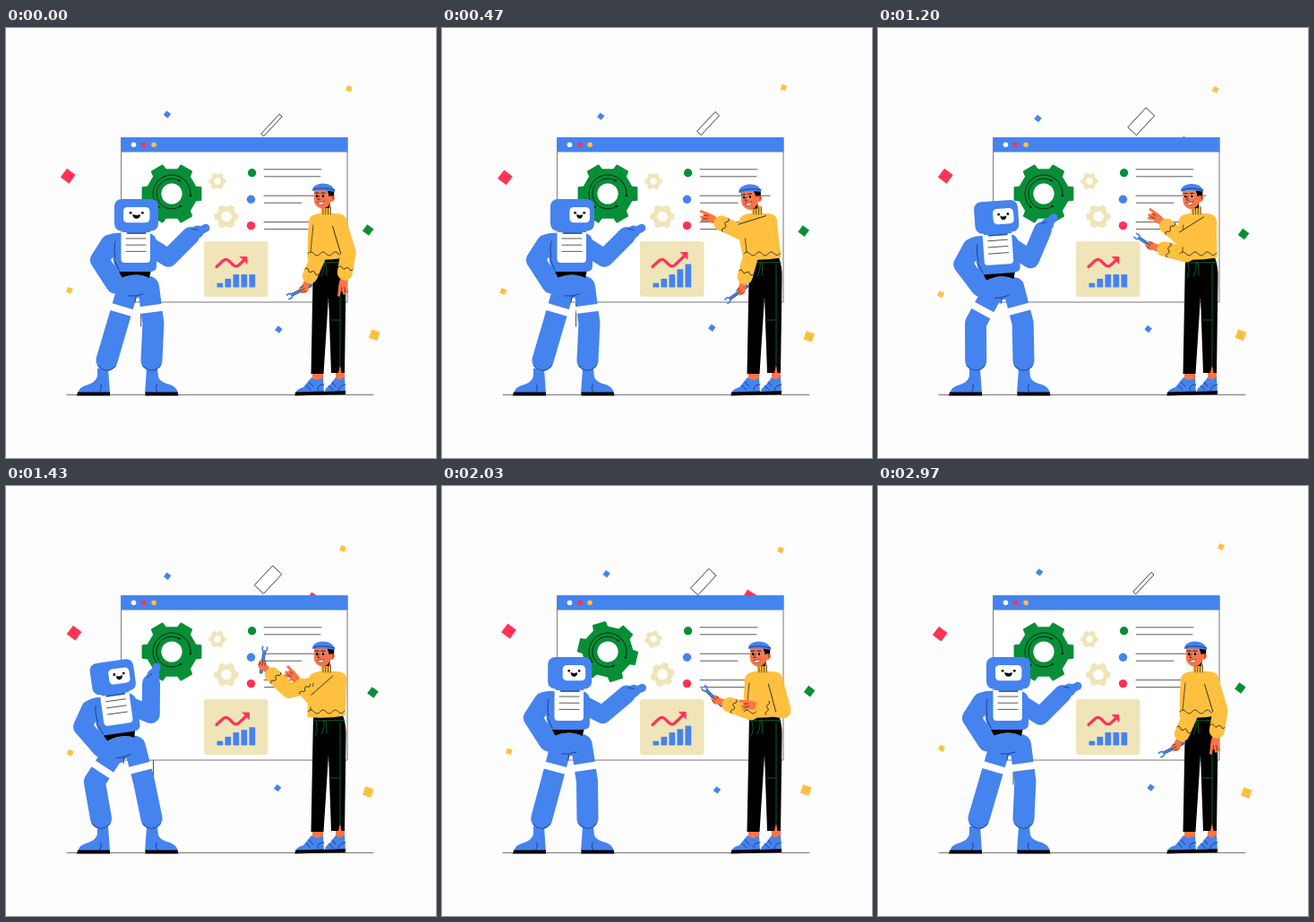
Recreate the animation shown at these times as an HTML page with a canvas. Size 480 by 480 pixels, loop 3 s.

```html
<!DOCTYPE html>
<html lang="en">
<head>
<meta charset="utf-8">
<title>Robot and mechanic</title>
<style>
html, body { margin: 0; width: 100%; height: 100%; overflow: hidden; background: #fdfdfd; }
canvas { display: block; width: 480px; height: 480px; }
</style>
</head>
<body>
<canvas width="480" height="480"></canvas>
<script>
const g = document.querySelector('canvas').getContext('2d');
const LOOP = 3000, RAD = Math.PI / 180;
const BLUE = '#4583ee', GREEN = '#088e37', RED = '#ff3355', YELLOW = '#ffc03f';
const CREAM = '#f0e5b8', SKIN = '#ff7347', INK = '#1c1c1c', NAVY = '#16336b';

// ---------- drawing helpers ----------
function shape(d, fill, stroke, width = 0.8) {
  const p = new Path2D(d);
  if (fill) { g.fillStyle = fill; g.fill(p); }
  if (stroke) { g.strokeStyle = stroke; g.lineWidth = width; g.stroke(p); }
}
const line = (d, color = INK, width = 0.8) => shape(d, null, color, width);
const limb = (pts, width, color) => line('M' + pts.join('L'), color, width);
function dot(x, y, r, color) {
  g.fillStyle = color;
  g.beginPath();
  g.arc(x, y, r, 0, 7);
  g.fill();
}
function box(x, y, w, h, r, color) {
  g.fillStyle = color;
  g.beginPath();
  g.roundRect(x, y, w, h, r);
  g.fill();
}
function placed(x, y, deg, draw) {
  g.save();
  g.translate(x, y);
  g.rotate(deg * RAD);
  draw();
  g.restore();
}
function square(x, y, size, deg, color) {
  placed(x, y, deg, () => box(-size / 2, -size / 2, size, size, 0, color));
}

// ---------- motion helpers ----------
const mix = (a, b, k) => a + (b - a) * k;
const polar = (r, deg) => [r * Math.cos(deg * RAD), r * Math.sin(deg * RAD)];
const heading = (a, b) => Math.atan2(b[1] - a[1], b[0] - a[0]) / RAD;
const toward = (a, b, k) => [mix(a[0], b[0], k), mix(a[1], b[1], k)];

// Eased 0..1 progress between two times
function step(t, from, to) {
  const k = Math.min(1, Math.max(0, (t - from) / (to - from)));
  return k * k * (3 - 2 * k);
}
// Slow float that is highest at the peak time
const wave = (t, mid, amp, peak) => mid + amp * Math.cos((t - peak) / LOOP * 2 * Math.PI);
// Run through moves of [from, to, pose]
const act = (t, start, moves) => moves.reduce((pose, [from, to, next]) =>
  pose.map((v, i) => mix(v, next[i], step(t, from, to))), start);
// Middle joint of a two-bone chain; side is 1 or -1
function joint(a, b, upper, lower, side) {
  const d = Math.hypot(b[0] - a[0], b[1] - a[1]);
  const cos = (d * d + upper * upper - lower * lower) / (2 * d * upper);
  const bend = Math.acos(Math.min(1, cos)) / RAD;
  const [x, y] = polar(upper, heading(a, b) + side * bend);
  return [a[0] + x, a[1] + y];
}

// ---------- background ----------
// color, size, x, y, time furthest right, time lowest
const CONFETTI = [
  [YELLOW, 6, 379.5, 69, 0, 2000],
  [BLUE, 6, 180.3, 98.5, 2200, 1200],
  [RED, 12, 72.7, 164.5, 1550, 600],
  [GREEN, 9, 407, 228, 1800, 1500],
  [YELLOW, 6, 71.5, 295.3, 2150, 1500],
  [BLUE, 6, 304, 337, 2300, 2150],
  [YELLOW, 10, 407.8, 342, 0, 600]
];
function confetti(t) {
  for (const [color, size, x, y, right, low] of CONFETTI)
    square(wave(t, x, 3.5, right), wave(t, y, 2.5, low), size, color === YELLOW ? 20 : 37, color);
}

function behindWindow(t) {
  const w = wave(t, 9, 5, 1500);
  placed(wave(t, 294.5, 2.8, 350), wave(t, 106.5, 2.3, 2700), -47,
    () => shape(`M-14.7 ${-w / 2}h29.4v${w}h-29.4z`, '#fff', INK));
  square(343, wave(t, 128.6, 4.8, 500), 12, 32, RED);
  line(`M${wave(t, 158, 9, 1800)} 306V333`);
}

function gear(x, y, r, hole, color, turn) {
  const teeth = 6;
  placed(x, y, turn, () => {
    const pts = [];
    for (let i = 0; i < teeth; i++)
      for (const [off, k] of [[-0.27, 0.83], [-0.2, 1], [0.2, 1], [0.27, 0.83]])
        pts.push(polar(r * k, (i + off) * 360 / teeth));
    shape('M' + pts.join('L') + 'z', color, color, r / 20);
    if (r > 20)
      for (const [rad, from, to] of [[21, 135, 365], [17, 55, 300]]) {
        g.strokeStyle = '#04200e';
        g.lineWidth = 0.9;
        g.beginPath();
        g.arc(0, 0, rad, from * RAD, to * RAD);
        g.stroke();
        for (const a of [from, to]) dot(...polar(rad, a), 1.3, '#04200e');
      }
    dot(0, 0, hole, '#fff');
  });
}

function chart(t) {
  box(221, 238, 71.5, 62, 3, CREAM);
  const grow = step(t, 0, 450) - step(t, 550, 950) + step(t, 1200, 1660) - step(t, 1850, 2300);
  for (let i = 0; i < 5; i++) {
    const h = 4.8 * (1 + Math.min(i, 2)) + Math.max(0, i - 2) * 5.8 * grow;
    box(235.5 + i * 9, 289.5 - h, 6.7, h, 0, BLUE);
  }
  const x = mix(268, 273, grow), y = mix(257, 252, grow);
  line(`M235 266.5L242 260Q246 256.5 249.5 260.5L253 264Q257 268 260.5 264L${x - 2} ${y + 2}`, RED, 3.2);
  shape(`M${x - 6.5} ${y - 1.5}h7.5v7.5z`, RED, RED);
}

function board(t) {
  shape('M129 122.5H381V306H129z', '#fff', '#555');
  box(128.6, 122, 252.8, 16.5, 0, BLUE);
  ['#fff', RED, YELLOW].forEach((c, i) => dot(142.5 + i * 11.3, 130.3, 2.8, c));

  const turn = 13 * (step(t, 1450, 1730) - step(t, 2400, 2750));
  gear(185, 185, 33.3, 11.6, GREEN, turn);
  gear(236, 171, 9.6, 3.7, CREAM, -turn);
  gear(246, 210.5, 13.4, 5.8, CREAM, -turn);

  [GREEN, BLUE, RED].forEach((c, i) => {
    const y = 161.8 + i * 29.4;
    dot(i ? 273.5 : 274.6, y, 4.7, c);
    line(`M288 ${y - 4}H${i ? 366 : 352}M288.5 ${y + 4}H${[351, 330, 338][i]}`, '#333');
  });
  chart(t);
}

// ---------- robot ----------
// hip x, hip y, tilt, look, wrist x, wrist y
const PRESENT = [144, 275, 0, 0, 206, 232];
const GLANCE = [144, 275, 0, 8, 206, 232];
const REACH = [127, 279, -8, 7, 162, 220];
const PUSH = [138.5, 275, 0.5, 8, 206, 233];

function robotLeg(hip, ankle, side) {
  const knee = joint(hip, ankle, 41, 41.4, side);
  limb([hip, knee, ankle], 24, BLUE);
  placed(...toward(hip, knee, 0.6), heading(hip, knee) - 90, () => box(-13, -4, 26, 8, 0, '#fff'));
  line(`M${ankle[0] - 10} ${ankle[1] + 6}q10 11 20 0`, NAVY, 0.7);
}

function robotHead(look) {
  box(121, 191, 49, 35.5, 8, BLUE);
  const half = 14.7 - look * 0.43, mid = 145.7 + look, gap = half * 0.45, lip = half * 0.27;
  box(mid - half, 200, half * 2, 17.2, 4.5, '#fff');
  for (const x of [mid - gap, mid + gap]) dot(x, 206.3, 1.4, '#000');
  shape(`M${mid - lip} 208.5Q${mid} 210 ${mid + lip} 208.5Q${mid + lip} 212.5 ${mid} 212.5T${mid - lip} 208.5z`,
    '#000', '#000', 0.5);
}

function robotBody(look) {
  shape('M125 281Q147 270 164 281Q172 288 172 303L152 305Q147 297 143 305L121 304z', BLUE);
  line('M137 299Q145 300 153 297M145 300L144 306', NAVY);
  shape('M125 270H162L160 279Q146 272 129 279z', '#000');
  limb([[116, 241], [104.5, 259], [122, 286]], 21, BLUE);
  shape('M114 231Q120 228 130 229H160Q168 231 168 240V266Q168 272 160 272H128Q121 272 121 265z', BLUE);
  line('M122 238Q120 246 122 257M121 259L126 270', NAVY);
  box(130, 224, 31, 8, 0, BLUE);
  box(128.5, 228, 32.5, 34, [0, 0, 4, 4], '#fff');
  for (let i = 0; i < 3; i++) line(`M134 ${235 + i * 7.2}h22`, '#333');
  shape('M133 225H158L156 230H135z', BLUE);
  line('M136 229H156', NAVY, 0.7);
  robotHead(look);
}

function robot(t) {
  const [hx, hy, tilt, look, wx, wy] = act(t, PRESENT, [
    [100, 400, GLANCE], [1050, 1350, REACH], [1480, 1710, PUSH], [1850, 2250, PRESENT]]);
  // A point of the upright body, carried along by the hips
  const at = (x, y) => {
    const [dx, dy] = polar(Math.hypot(x - 144, y - 275), heading([144, 275], [x, y]) + tilt);
    return [hx + dx, hy + dy];
  };

  shape('M102 380H114L116 408H80Q82 400 92 398Q101 395 102 388z', BLUE);
  shape('M157 380H169L170 390Q173 396 183 398Q191 401 192 408H155z', BLUE);
  line('M106 398Q107 404 104 407M168 398Q166 403 169 407', NAVY);
  shape('M80 406.5H116V410.5H79zM155.5 406.5H191.5L192.5 410.5H155.5z', '#000');
  robotLeg(at(159, 289), [162.5, 371], -1);
  robotLeg(at(136, 291), [112.5 + (hx - 144) * 0.38, 371], 1);

  const shoulder = at(161, 244), wrist = [wx, wy];
  const elbow = joint(shoulder, wrist, 24, 35, 1);
  limb([shoulder, elbow, wrist], 20, BLUE);
  placed(wx, wy, heading(elbow, wrist) + 15, () => {
    limb([[0, 0], [9, 0]], 14, BLUE);
    limb([[0, 0], [19, 1]], 9, BLUE);
    line('M5 -6L10 -2', NAVY, 0.7);
  });
  placed(hx, hy, tilt, () => {
    g.translate(-144, -275);
    robotBody(look);
  });
}

// ---------- mechanic ----------
// head shift, tool hand x, y, tool angle, free hand x, y
const REST = [0, 333, 291, 153, 376, 287];
const POINT = [-10, 334, 293, 144, 299, 212];
const SHOW = [-7.5, 323, 287, 148, 302, 211.5];
const LIFT = [0, 286, 200, 279, 321, 212.5];

function sleeve(shoulder, elbow, hand) {
  const turn = heading(elbow, hand);
  const wrist = toward(hand, elbow, 0.38);
  limb([shoulder, elbow, wrist], 17, YELLOW);
  placed(...wrist, turn, () => line('M-5 -8q3 2 0 4t0 4t0 4t0 4'));
}

function toolArm(shoulder, hand, angle) {
  const elbow = joint(shoulder, hand, 33, 41.5, -1);
  placed(...hand, angle, () => {
    line('M-8 0H15', INK, 3.4);
    line('M-8 0H15', BLUE, 2.6);
    line('M20.5 -2.5Q15.5 -3.5 15.5 0T20.5 2.5', BLUE, 1.8);
  });
  limb([toward(hand, elbow, 0.38), hand], 7.5, SKIN);
  placed(...hand, angle, () => {
    dot(0, 0, 4.8, SKIN);
    for (const y of [-3, 0, 3]) line(`M0 ${y}H5`, INK, 0.6);
  });
  sleeve(shoulder, elbow, hand);
}

function freeArm(shoulder, hand) {
  const elbow = joint(shoulder, hand, 35, 37, -1);
  limb([toward(hand, elbow, 0.38), hand], 7.5, SKIN);
  placed(...hand, heading(elbow, hand), () => {
    line('M-3 0H3', SKIN, 9);
    line('M2 3L12 2.5M3 -1L9 -3M1 -3L7 -6', SKIN, 2.9);
    line('M3 1L8 0M2 -2L7 -4', INK, 0.6);
  });
  sleeve(shoulder, elbow, hand);
  placed(...shoulder, heading(shoulder, elbow), () => line('M2 8.4H34'));
}

function mechanicHead() {
  shape('M358 180H366.5L366 188L361 190z', '#000');
  shape('M344 181H358L360 188Q367 185 367 190Q366 195 362 194L361 199Q354 205 347 199Q343 196 344 188z', SKIN);
  line('M362 187Q366 186 365 191', INK, 0.7);
  shape('M356 201Q362 198 362 193L361 201z', '#000');
  shape('M342 182Q342 174 354 173.5Q366 174 367 183Q354 180 342 182z', BLUE);
  line('M343 180Q354 177 367 181', NAVY);
  for (const x of [347, 354]) {
    box(x - 2, 185.7, 4, 3.4, 1, '#fff');
    dot(x, 187.4, 1.6, '#000');
    line(`M${x - 2} 184.2h4`, INK, 1);
  }
  line('M349.5 187L348 191.5L350.5 191.8', INK, 0.7);
  shape('M348 194.5Q352 195.5 355.5 193Q354 197.5 351 197.3Q348.5 197 348 194.5z', '#fff', INK, 0.5);
}

function mechanicLegs() {
  shape('M342 383H354V394H342zM368 376H378V394H368z', SKIN);
  shape('M341 390Q347 396 354 390L355 408H323Q324 403 332 401z', BLUE);
  shape('M368 390Q373 395 378 389L379 408H355Q356 402 361 399z', BLUE);
  line('M335 399l5 5M338 395l5 5M348 404Q347 398 355 398M360 399l5 5M364 395l4 5M371 405Q371 399 379 398', NAVY);
  shape('M323 406.5L355 405.5V409.5L322.5 410.5zM355 406L379 405V409L355 409.5z', '#000');
  shape('M343 256L376 256Q380 266 379.5 280L378 385L374.5 385L373 376L371 385H363L360 300L354.5 386H340.5z', '#000');
  line('M344 262L378 261.5M355 261Q356 270 352 277M357 262L358 276M373 264V376M346 263Q349 272 345 279M363 326H372', '#0a7a32');
}

function mechanic(t) {
  const [shift, toolX, toolY, angle, handX, handY] = act(t, REST, [
    [80, 420, POINT], [560, 900, SHOW], [1040, 1360, LIFT], [1850, 2250, REST]]);
  const lean = shift * 0.6, l = 337 + lean, r = 380 + lean;

  mechanicLegs();
  toolArm([348 + lean / 2, 220], [toolX, toolY], angle);

  shape(`M${l + 1} 214Q${l + 3} 208 ${l + 13} 207L${r - 12} 207Q${r} 207 ${r} 216L378.5 256.5Q356 260 336.5 258L${l} 232z`, YELLOW);
  line('M337 252q3.4 -4 6.8 0t6.8 0t6.8 0t6.8 0t6.8 0t6.8 -1');
  line(`M${l + 6} 220L340 250`, INK, 0.7);
  box(l + 14.5, 198, 11, 10, 0, YELLOW);
  for (let x = l + 17; x < l + 26; x += 2.8) line(`M${x} 200v8`, INK, 0.7);
  placed(354 + shift, 188 - shift * 0.1, shift * 0.6, () => {
    g.translate(-354, -188);
    mechanicHead();
  });

  freeArm([372 + lean, 217], [handX, handY]);
}

// ---------- loop ----------
function frame(now) {
  const t = now % LOOP;
  g.fillStyle = '#fdfdfd';
  g.fillRect(0, 0, 480, 480);
  g.lineCap = g.lineJoin = 'round';
  behindWindow(t);
  board(t);
  confetti(t);
  line('M68 409.5H410', '#555');
  robot(t);
  mechanic(t);
  requestAnimationFrame(frame);
}
requestAnimationFrame(frame);
</script>
</body>
</html>
```
